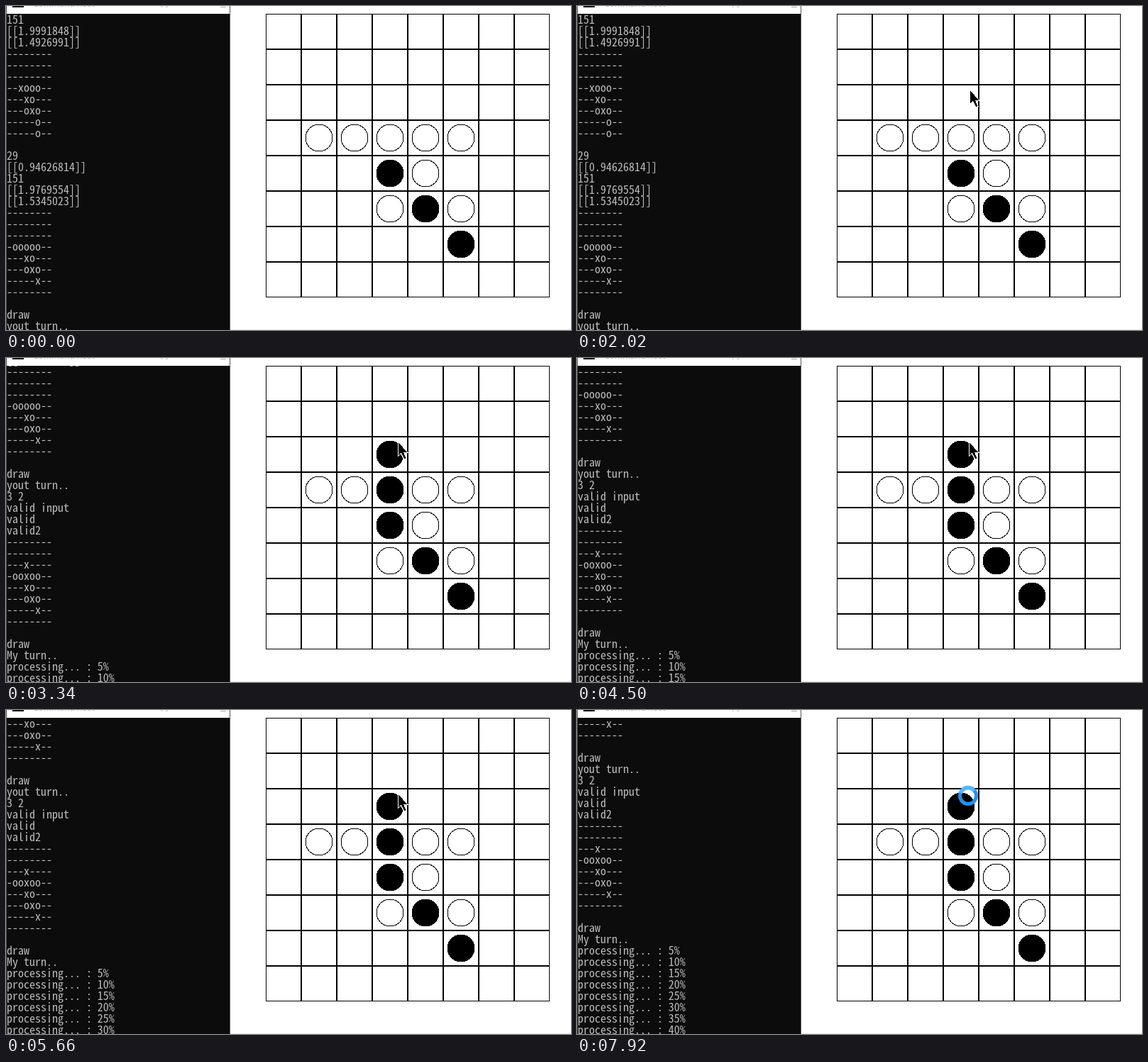
These frames come from a looping animation (796x457 px, 8 s). An HTML page:

```html
<!DOCTYPE html>
<html lang="en">
<head>
<meta charset="utf-8">
<title>Reversi against the console</title>
<style>
html, body { margin: 0; width: 100%; height: 100%; overflow: hidden; background: #fff; }
svg { display: block; width: 796px; height: 457px; }
.title { font: 12px "Noto Sans", sans-serif; fill: #bbb; }
#log { font: 16px "Noto Sans Mono CJK JP", "Noto Sans Mono", monospace; fill: #bcbcbc; }
#cells rect, .disc { stroke: #000; fill: #fff; shape-rendering: crispEdges; }
#cells rect { fill: none; }
.disc.x { fill: #000; }

#log, .late, #pointer, #busy, #glow { animation: 8s step-end infinite; }
#log { animation-name: scroll; }
.late { animation-name: move; }
#pointer { animation-name: point; }
#busy { animation-name: busy; }
#glow { animation-name: spin; transform-origin: 551px 121px; }

@keyframes scroll {
  0% { transform: translateY(0); }
  27.2% { transform: translateY(-240px); }
  37.7% { transform: translateY(-256px); }
  41.7% { transform: translateY(-272px); }
  56.2% { transform: translateY(-288px); }
  63.1% { transform: translateY(-304px); }
  64.95% { transform: translateY(-320px); }
  70.7% { transform: translateY(-336px); }
  83.3% { transform: translateY(-352px); }
  90.2%, 100% { transform: translateY(-368px); }
}
@keyframes move {
  0% { opacity: 0; }
  27.2%, 100% { opacity: 1; }
}
@keyframes point {
  0% { transform: translate(-50px, 0); }
  7.85% { transform: translate(637px, 262px); }
  8.85% { transform: translate(611px, 222px); }
  9.8% { transform: translate(579px, 176px); }
  10.7% { transform: translate(545px, 136px); }
  11.7% { transform: translate(513px, 133px); }
  12.7% { transform: translate(492px, 133px); }
  13.7% { transform: translate(484px, 133px); }
  17.45% { transform: translate(-50px, 0); }
  21.35% { transform: translate(569px, -4px); }
  22.35% { transform: translate(566px, 46px); }
  23.3% { transform: translate(561px, 86px); }
  24.2% { transform: translate(557px, 110px); }
  25.2% { transform: translate(554px, 119px); }
  26.2% { transform: translate(553px, 119px); }
  94.2%, 100% { transform: translate(-50px, 0); }
}
@keyframes busy {
  0% { opacity: 0; }
  94.2%, 100% { opacity: 1; }
}
@keyframes spin {
  0% { transform: rotate(40deg); }
  96.1% { transform: rotate(80deg); }
  97.1% { transform: rotate(120deg); }
  98.1% { transform: rotate(160deg); }
  98.95%, 100% { transform: rotate(200deg); }
}
</style>
</head>
<body>
<svg viewBox="0 0 796 457">
  <defs><clipPath id="pane"><rect x="0" y="11" width="316" height="446"/></clipPath></defs>
  <rect width="796" height="457" fill="#fff"/>
  <path d="M316 456.5H796" stroke="#ececec"/>

  <rect x="9" width="16" height="2" fill="#111"/>
  <g class="title">
    <text x="38" y="1">Command host</text>
    <text x="218" y="-1">py</text>
  </g>
  <path d="M302 1.5H310" stroke="#aaa"/>
  <rect y="11" width="316" height="446" fill="#0c0c0c"/>
  <path d="M.5 0V457M315.5 0V457" stroke="#555"/>
  <g clip-path="url(#pane)"><g id="log"></g></g>

  <g id="cells"></g>
  <g id="discs"></g>

  <path id="pointer" d="M0 0V18L4 14.5L8 23.5L10.5 22.5L7 14H12Z" stroke="#fff" stroke-width="2.4"
    paint-order="stroke" shape-rendering="crispEdges"/>
  <g id="busy" fill="none" stroke-width="5">
    <circle cx="551" cy="121" r="11.5" stroke="#2490ee"/>
    <circle id="glow" cx="551" cy="121" r="11.5" stroke="#56b8f8" stroke-dasharray="24 100"/>
  </g>
</svg>
<script>
const rule = '--------';
const older = `151
[[1.9991848]]
[[1.4926991]]
${rule}
${rule}
${rule}
--xooo--
---xo---
---oxo--
-----o--
-----o--

29
[[0.94626814]]
151
[[1.9769554]]
[[1.5345023]]
${rule}
`;
const before = [rule, rule, '-ooooo--', '---xo---', '---oxo--', '-----x--', rule];
const after = [rule, rule, '---x----', '-ooxoo--', '---xo---', '---oxo--', '-----x--', rule];
const lines = [
  ...older.trimEnd().split('\n'), ...before, '', 'draw', 'yout turn..',
  '3 2', 'valid input', 'valid', 'valid2', ...after, '', 'draw', 'My turn..',
  ...Array.from({ length: 8 }, (_, i) => `processing... : ${5 * (i + 1)}%`)
];

function add(parent, tag, attrs) {
  const el = document.createElementNS('http://www.w3.org/2000/svg', tag);
  for (const key in attrs) el.setAttribute(key, attrs[key]);
  return document.getElementById(parent).appendChild(el);
}

lines.forEach((line, i) => {
  add('log', 'text', { x: 1, y: 25 + 16 * i }).textContent = line;
});

// Keep the console grid at 8px per character whichever font is present.
const advance = log.children[3].getComputedTextLength() / 8;
log.style.fontSize = `${16 * 8 / advance}px`;

const left = 366, top0 = 11, cell = 50;
for (let i = 0; i < 64; i++) {
  add('cells', 'rect', {
    x: left + (i % 8) * cell + .5, y: top0 + (i >> 3) * cell + .5, width: 49, height: 49
  });
}

function disc(col, row, kind) {
  add('discs', 'circle', {
    class: `disc ${kind}`, cx: left + col * cell + 25, cy: top0 + row * cell + 25, r: 19
  });
}
before.slice(2, 6).forEach((line, i) => {
  [...line].forEach((mark, col) => {
    if (mark !== '-') disc(col, i + 3, mark);
  });
});
disc(3, 2, 'x late');
disc(3, 3, 'x late');
</script>
</body>
</html>
```
